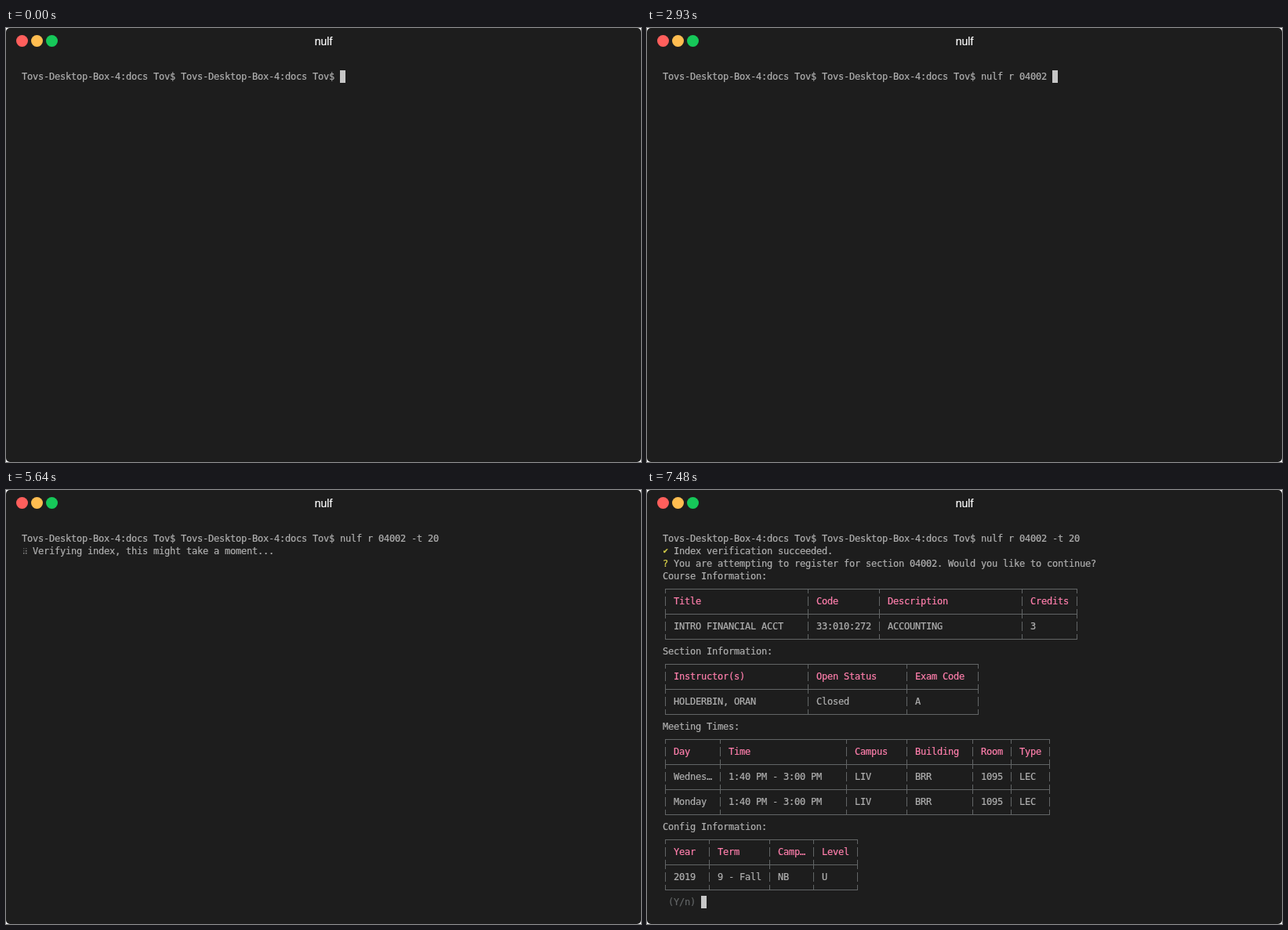
An HTML page with a canvas that plays this animation: 810 px wide and 554 px high, repeating every 8000 ms.

```html
<!DOCTYPE html>
<html lang="en">
<head>
<meta charset="utf-8">
<title>Terminal</title>
<style>
html, body { margin: 0; width: 100%; height: 100%; overflow: hidden; background: #fff; }
canvas { display: block; }
</style>
</head>
<body>
<canvas id="stage" width="810" height="554"></canvas>
<script>
const ctx = document.getElementById('stage').getContext('2d');
const LOOP = 8000, CELL = 7, LINE = 16, LEFT = 20, TOP = 54;
const FG = '#afafaf', DIM = '#626566', PINK = '#ff7fac', MARK = '#d9d24a';
const MONO = '12px "DejaVu Sans Mono", monospace';
const PROMPT = 'Tovs-Desktop-Box-4:docs Tov$ '.repeat(2);

// [time, command typed so far]
const typing = [
  [0, ''], [670, 'n'], [890, 'nu'], [990, 'nul'], [1140, 'nulf'], [1250, 'nulf '],
  [1420, 'nulf r'], [1600, 'nulf r '], [2050, 'nulf r 04002'], [2930, 'nulf r 04002 '],
  [3520, 'nulf r 04002 -'], [3650, 'nulf r 04002 -t'], [3910, 'nulf r 04002 -t '],
  [4320, 'nulf r 04002 -t 2'], [4460, 'nulf r 04002 -t 20']
];
const ENTER = 4900, SPIN = 5240, DONE = 7460, REPORT = 7480, SPIN_STEP = 80;
const spinner = [...'⠋⠙⠹⠸⠼⠴⠦⠧⠇⠏'];

// bars: columns of the vertical rules; the first row is the header
const tables = [
  { title: 'Course Information:', row: 3, bars: [0, 26, 39, 65, 75], rows: [
    ['Title', 'Code', 'Description', 'Credits'],
    ['INTRO FINANCIAL ACCT', '33:010:272', 'ACCOUNTING', '3']] },
  { title: 'Section Information:', row: 9, bars: [0, 26, 44, 57], rows: [
    ['Instructor(s)', 'Open Status', 'Exam Code'],
    ['HOLDERBIN, ORAN', 'Closed', 'A']] },
  { title: 'Meeting Times:', row: 15, bars: [0, 10, 33, 44, 56, 63, 70], rows: [
    ['Day', 'Time', 'Campus', 'Building', 'Room', 'Type'],
    ['Wednes…', '1:40 PM - 3:00 PM', 'LIV', 'BRR', '1095', 'LEC'],
    ['Monday', '1:40 PM - 3:00 PM', 'LIV', 'BRR', '1095', 'LEC']] },
  { title: 'Config Information:', row: 23, bars: [0, 8, 19, 27, 35], rows: [
    ['Year', 'Term', 'Camp…', 'Level'],
    ['2019', '9 - Fall', 'NB', 'U']] }
];

const colX = col => LEFT + col * CELL;
const rowY = row => TOP + row * LINE;

function rect(x, y, w, h, color) {
  ctx.fillStyle = color;
  ctx.fillRect(x, y, w, h);
}

// A thin outline gives the text its slightly heavy look.
function ink(text, x, y, color, font) {
  ctx.font = font;
  ctx.fillStyle = ctx.strokeStyle = color;
  ctx.lineWidth = 0.2;
  ctx.fillText(text, x, y);
  ctx.strokeText(text, x, y);
}

function print(text, col, row, color = FG) {
  [...text].forEach((ch, i) => ink(ch, colX(col + i), rowY(row) + 12, color, MONO));
}

function cursor(col, row) {
  rect(colX(col), rowY(row), CELL, LINE, '#c7c7c7');
}

function drawWindow() {
  ctx.clearRect(0, 0, 810, 554);
  ctx.fillStyle = '#1d1d1d';
  ctx.beginPath();
  ctx.roundRect(0, 0, 810, 554, 5);
  ctx.fill();
  ['#ff5f5c', '#ffbd50', '#16c859'].forEach((color, i) => {
    ctx.fillStyle = color;
    ctx.beginPath();
    ctx.arc(20.5 + 19 * i, 16.5, 7.5, 0, 2 * Math.PI);
    ctx.fill();
  });
  ctx.textAlign = 'center';
  ink('nulf', 405, 22, '#fff', '14px "Liberation Sans", Arial, sans-serif');
  ctx.textAlign = 'left';
}

function drawSpinner(glyph) {
  const bits = glyph.codePointAt(0) - 0x2800;
  for (let i = 0; i < 6; i++) {
    const x = 22 + 3 * Math.floor(i / 3), y = 74 + 3 * (i % 3);
    rect(x, y, 1.5, 1.5, bits >> i & 1 ? '#8f8f8f' : '#555');
  }
}

function drawTable({ title, row, bars, rows }) {
  print(title, 0, row);
  const barX = bars.map(col => colX(col) + 3);
  const last = rows.length * 2;
  for (let i = 0; i <= last; i++) {
    const y = rowY(row + 1 + i);
    if (i % 2) {
      barX.forEach(x => rect(x, y + 2, 1, 12, DIM));
      rows[(i - 1) / 2].forEach((text, k) =>
        print(text, bars[k] + 2, row + 1 + i, i === 1 ? PINK : FG));
    } else {
      const from = i ? 2 : 8, to = i < last ? 14 : 9;
      rect(barX[0], y + 8, barX.at(-1) - barX[0] + 1, 1, DIM);
      barX.forEach(x => rect(x, y + from, 1, to - from, DIM));
    }
  }
}

function drawReport() {
  print('?', 0, 2, MARK);
  print('You are attempting to register for section 04002. Would you like to continue?', 2, 2);
  tables.forEach(drawTable);
  print('(Y/n)', 1, 29, DIM);
  cursor(7, 29);
}

function draw(t) {
  drawWindow();
  const line = PROMPT + typing.findLast(([at]) => t >= at)[1];
  print(line, 0, 0);
  if (t < ENTER) {
    cursor(line.length, 0);
  } else if (t < SPIN) {
    cursor(0, 1);
  } else if (t < DONE) {
    const step = Math.min(21, Math.floor((t - SPIN) / SPIN_STEP));
    drawSpinner(spinner[step % spinner.length]);
    print('Verifying index, this might take a moment...', 2, 1);
  } else {
    ink('✔', LEFT, rowY(1) + 11, MARK, '9px "DejaVu Sans", sans-serif');
    print('Index verification succeeded.', 2, 1);
    if (t < REPORT) cursor(0, 2);
    else drawReport();
  }
}

const start = performance.now();
function tick() {
  draw((performance.now() - start) % LOOP);
  requestAnimationFrame(tick);
}
tick();
</script>
</body>
</html>
```
